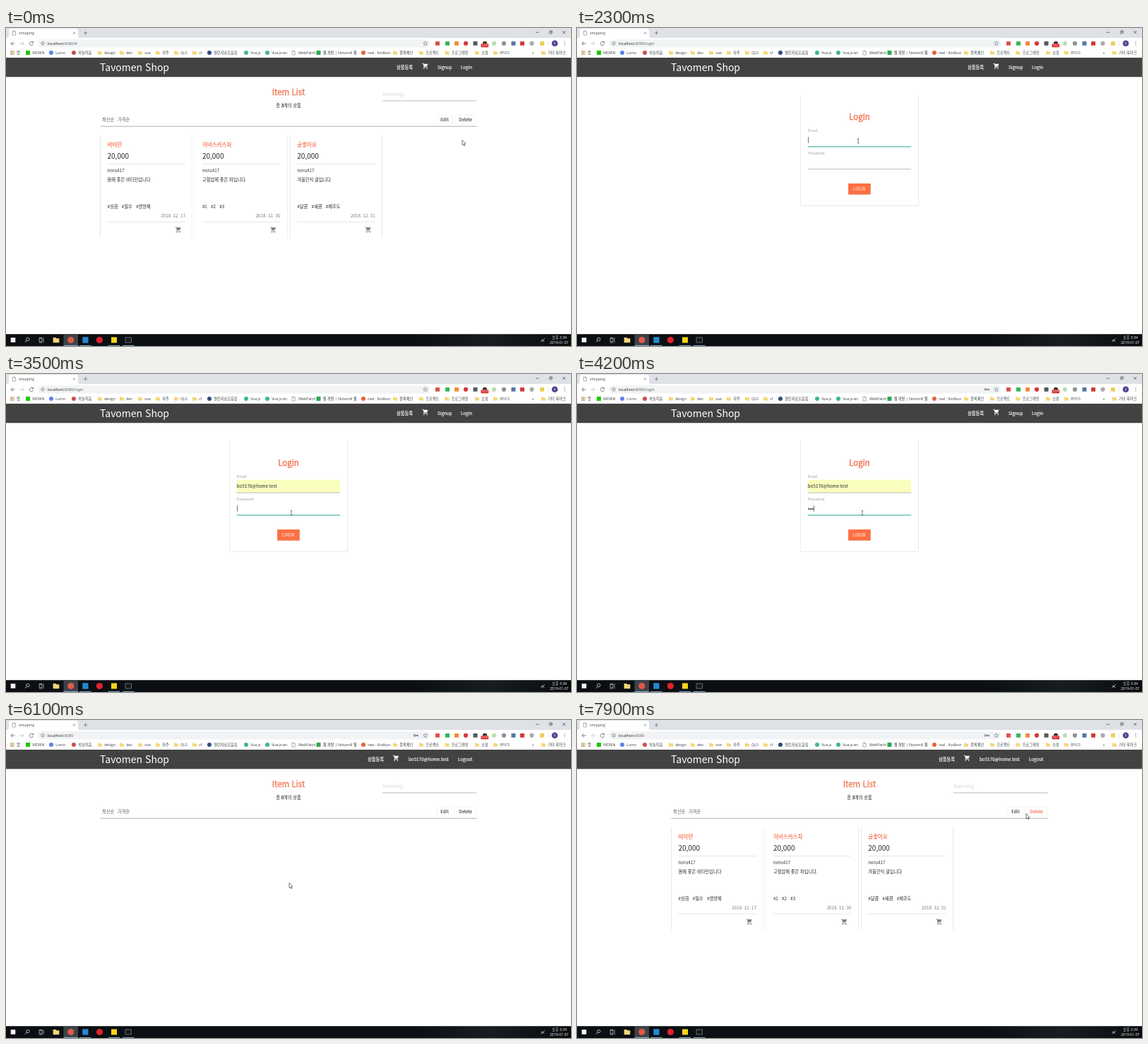
Write an HTML page that moves like this. It is 800x450 px and loops after 8 s.

```html
<!DOCTYPE html>
<html lang="ko">
<head>
<meta charset="utf-8">
<title>shopping</title>
<style>
html, body { margin: 0; width: 100%; height: 100%; overflow: hidden; background: #fff; }
svg { display: block; width: 800px; height: 450px; }
text { white-space: pre; font-family: "Noto Sans CJK KR", "Noto Sans CJK JP", "Noto Sans", sans-serif; }
.ui { font-family: "Open Sans", "Noto Sans CJK KR", "Noto Sans CJK JP", sans-serif; }
.card { filter: drop-shadow(0 .7px .6px rgba(0, 0, 0, .38)); }
</style>
</head>
<body>
<svg id="stage" viewBox="0 0 800 450"></svg>
<script>
const NS = 'http://www.w3.org/2000/svg';
const LOOP = 8000, TICK = 100;
const ORANGE = '#f26f4f', TEAL = '#26a69a', MAIL = 'bo5170@home.test';
const stage = document.getElementById('stage');
let layer = stage;

function el(tag, attrs = {}, parent = layer) {
  const node = document.createElementNS(NS, tag);
  for (const k in attrs) node.setAttribute(k, attrs[k]);
  parent.appendChild(node);
  return node;
}
const rect = (x, y, width, height, fill, more) => el('rect', { x, y, width, height, fill, ...more });
const dot = (cx, cy, r, fill, more) => el('circle', { cx, cy, r, fill, ...more });
const line = (d, stroke, width = .7, more) =>
  el('path', { d, stroke, 'stroke-width': width, fill: 'none', ...more });
const shape = (d, fill, more) => el('path', { d, fill, ...more });
function text(x, y, str, size, fill, more) {
  const node = el('text', { x, y, 'font-size': size, fill, ...more });
  node.textContent = str;
  return node;
}
const ui = (x, y, str, size, fill, more) => text(x, y, str, size, fill, { class: 'ui', ...more });
const medium = (x, y, str, size, fill, more) =>
  text(x, y, str, size, fill, { stroke: fill, 'stroke-width': size * .028, ...more });
const mid = { 'text-anchor': 'middle' }, end = { 'text-anchor': 'end' };

function group(build, attrs) {
  const outer = layer, g = el('g', attrs);
  layer = g;
  build();
  layer = outer;
  return g;
}
const show = (node, on) => { node.style.display = on ? '' : 'none'; };

function cart(x, y, fill) {
  group(() => {
    shape('M1 2H4.3L5.2 4H20.5L16.5 13H8.1L7 15H19V17H6Q4 17 5.3 14L6.6 11.6 3 4H1Z', fill);
    dot(7, 20, 2, fill);
    dot(17, 20, 2, fill);
  }, { transform: `translate(${x} ${y}) scale(.4167)` });
}
function folder(x, y, s = 1) {
  shape('M-3-2.5H-.5L.3-1.6H3V2.5H-3Z', '#f4d675', { transform: `translate(${x} ${y}) scale(${s})` });
}
function sheet(x, y) {
  line(`M${x - 2} ${y - 3}h2.6l1.6 1.6v4.4h-4.2zM${x + .5} ${y - 3}v1.7h1.7`, '#666', .5);
}

// Browser frame
rect(0, 0, 800, 450, '#fff');
rect(0, 0, 800, 14, '#dee1e6');
shape('M1 14Q4 14 4 11V4Q4 1 7 1H99Q102 1 102 4V11Q102 14 105 14Z', '#fff');
sheet(11.5, 7);
ui(18, 9, 'shopping', 5.1, '#45494d');
line('M95 5.5l3 3m0-3l-3 3', '#5f6368', .6);
line('M110 7h5M112.5 4.5v5', '#5f6368', .7);
line('M750 6.2h4.5M788.2 4l4 4m0-4l-4 4', '#222', .6);
line('M769.3 4.9h2.9v2.9h-2.9zM770.4 4.9v-1h2.9v2.9h-1.1', '#222', .5);
line('M12.5 22H7m2.5-2.6L7 22l2.5 2.6', '#5f6368', .8);
line('M19.5 22H25m-2.5-2.6L25 22l-2.5 2.6', '#bcc0c4', .8);
line('M38 20.3A2.7 2.7 0 1 0 38.5 22.8M38.6 18.9v2h-2', '#5f6368', .8);
rect(45, 16.2, 555, 11.2, '#f1f3f4', { rx: 5.6 });
dot(52, 21.8, 2.3, 'none', { stroke: '#5f6368', 'stroke-width': .6 });
line('M52 21.5v1.6M52 20.2v.6', '#5f6368', .6);
const url = ui(59, 23.8, '', 5.4, '#5f6368');
const host = el('tspan', { fill: '#202124' }, url), path = el('tspan', {}, url);
host.textContent = 'localhost';
const key = group(() => {
  dot(578.6, 21.8, 1.3, 'none', { stroke: '#555', 'stroke-width': .9 });
  line('M580 21.8h3.5v1.4m-1.3-1.4v1.2', '#555', .9);
});
line('M593.8 18.8l.9 2 2.1.2-1.6 1.4.5 2.1-1.9-1.1-1.9 1.1.5-2.1-1.6-1.4 2.1-.2z', '#5f6368', .55);

// Extension buttons: x, colour, round
[[611, '#d9534a'], [625, '#35b558'], [638, '#f08a3c'], [651, '#d6373c', 1], [664.5, '#55585c'],
 [678, '#3b3431', 1], [691, '#b9dfae', 1], [705, '#8d9296', 1], [718.5, '#54779f'],
 [731, '#d23a3a'], [744.5, '#a7abae', 1], [759, '#eecf58']].forEach(([x, c, round]) =>
  round ? dot(x, 21.8, 3.1, c) : rect(x - 3, 19, 6, 5.8, c, { rx: .6 }));
rect(672.5, 22.2, 10.6, 5, '#d71f1f', { rx: .8 });
const badge = ui(677.8, 26.4, '', 4.4, '#fff', mid);
line('M767.5 18.5v6.5', '#d4d7da', .5);
dot(777, 21.8, 4.3, '#4b4491');
ui(777, 23.7, 'Y', 5.2, '#fff', mid);
[19.6, 21.8, 24].forEach(y => dot(791, y, .6, '#5f6368'));

// Bookmarks: icon centre, label, colour (folder when absent)
[[31, 'MORIN', '#1ec800'], [64, 'Lumo', '#5b82e8', 1], [96, '하늘피움', '#c9504a', 1], [133, 'design'],
 [164, 'dev'], [190, 'vue'], [215, '자주'], [241, 'QLS'], [267, 'cf'],
 [288, '열린자료모음집', '#334b80', 1], [340, 'Vue.js', '#41b883', 1], [370, 'Vue.js-en', '#41b883', 1],
 [407, '.WebPatch', 'sheet'], [442.5, '웹 개발 | Notamill 웹', '#2fa84f'], [506, 'real · Kodbun', '#e8623a', 1],
 [551, '블록체인'], [588, '프로젝트'], [624.5, '프로그래밍'], [667, '쇼핑'], [693, 'EPICS'], [761, '기타 북마크']
].forEach(([x, label, c, round]) => {
  if (!c) folder(x, 35);
  else if (c === 'sheet') sheet(x, 35);
  else if (round) dot(x, 35, 3, c);
  else rect(x - 3, 32, 6, 6, c);
  ui(x + 6.2, 36.9, label, 5.2, '#3c4043');
});
for (let i = 0; i < 9; i++)
  rect(6.5 + i % 3 * 2.1, 32.3 + Math.floor(i / 3) * 2.1, 1.5, 1.5, ['#e66a55', '#5ca866', '#e6b34d'][i % 3]);
ui(15, 36.9, '앱', 5.2, '#3c4043');
ui(744.5, 37, '»', 6, '#3c4043');

// Site header
rect(0, 42, 800, 27.2, '#424242', { class: 'card' });
text(133, 61, 'Tavomen Shop', 14, '#fff');
const guestNav = group(() => {
  medium(553, 58, '상품등록', 6.25, '#fff');
  cart(589, 49, '#fff');
  medium(611, 58, 'Signup', 6.25, '#fff');
});
const loginLink = group(() => {
  rect(638, 42, 29, 27.2, 'rgba(0,0,0,.12)');
});
const loginLabel = medium(644, 58, 'Login', 6.25, '#fff');
const userNav = group(() => {
  medium(512, 58, '상품등록', 6.25, '#fff');
  cart(547.5, 49, '#fff');
  medium(570, 58, MAIL, 6.25, '#fff');
  medium(640, 58, 'Logout', 6.25, '#fff');
});

// Item list
let count, deleteLabel, cards;
const listPage = group(() => {
  medium(400, 95, 'Item List', 11.5, '#ee7858', mid);
  const total = text(400, 112, '총 ', 6.25, '#222', mid);
  count = el('tspan', { stroke: '#222', 'stroke-width': .25 }, total);
  el('tspan', {}, total).textContent = '개의 상품';
  text(533, 96, 'Searching..', 6.25, '#d2d2d2');
  line('M533 103H666.5', '#a8a8a8', .8);
  text(136, 132, '최신순', 6.25, '#5c5c5c');
  text(158, 132, '가격순', 6.25, '#5c5c5c');
  line('M133.3 139.2H666.7', '#b0b0b0', 1);
  [[610, 22], [635, 31]].forEach(([x, w]) =>
    rect(x, 123, w, 13.2, '#fff', { rx: 3, stroke: '#ececec', 'stroke-width': .6 }));
  medium(621, 132, 'Edit', 6.25, '#444', mid);
  deleteLabel = medium(650.7, 132, 'Delete', 6.25, '#444', mid);
  cards = group(() => [
    ['비타민', '몸에 좋은 비타민입니다', '#상큼   #필수   #영양제', '2018. 12. 17'],
    ['히비스커스차', '고혈압에 좋은 차입니다.', '#1   #2   #3', '2018. 11. 30'],
    ['귤좋아요', '겨울간식 귤입니다', '#달콤   #새콤   #제주도', '2018. 12. 31']
  ].forEach(([name, note, tags, date], i) => group(() => {
    rect(0, 151, 130.3, 146, '#fff', { rx: .9, class: 'card' });
    medium(10, 167.7, name, 7.5, ORANGE);
    text(10, 185, '20,000', 10, '#222');
    line('M10 192.5H120.3M10 274.5H120.3', '#dcdcdc', .7);
    text(10, 204, 'noru417', 6.25, '#333');
    text(10, 217, note, 6.25, '#222');
    text(10, 254.5, tags, 6.25, '#222');
    text(120.5, 268, date, 6.25, '#7a7a7a', end);
    cart(105.7, 280.7, '#7d7d7d');
  }, { transform: `translate(${133.5 + i * 134.4} 0)` })));
});

// Login form
let mailFill, mailLine, passLine, squiggle, caret;
const dots = [];
const loginPage = group(() => {
  rect(316.7, 94, 166.7, 157.5, '#fff', { rx: .9, class: 'card' });
  medium(400, 129.5, 'Login', 11.5, ORANGE, mid);
  text(326.8, 147, 'Email', 5.3, '#9e9e9e');
  text(326.8, 178.8, 'Password', 5.3, '#9e9e9e');
  mailFill = group(() => {
    rect(326.8, 149.7, 146.4, 18.3, '#faffbd');
    text(326.8, 161, MAIL, 6.25, '#222');
  });
  squiggle = line('M327 163' + 'q.6-1 1.2 0t1.2 0'.repeat(9), '#e53935', .45);
  mailLine = line('M326.8 168H473.2', '#9e9e9e');
  passLine = line('M326.8 199.7H473.2', '#9e9e9e');
  for (let i = 0; i < 8; i++) dots.push(dot(328.3 + i * 2.7, 191, 1, '#111'));
  caret = rect(0, 0, .6, 8.4, '#111');
  rect(384.2, 220, 31.4, 15.6, '#ff7043', { rx: .9, class: 'card' });
  text(400, 229.8, 'LOGIN', 5.7, '#fff', { ...mid, 'letter-spacing': .2 });
});

const status = group(() => {
  rect(-1, 424.4, 267.5, 9.6, '#f3f4f5', { stroke: '#d5d8db', 'stroke-width': .5, rx: 1 });
  ui(1.2, 430.8, 'localhost:8080/login', 5, '#5f6368');
});

// Taskbar
const fade = el('linearGradient', { id: 'bar' });
[['0', '#0b0f13'], ['.72', '#0b0f12'], ['.86', '#171d20'], ['1', '#080b0e']].forEach(([offset, c]) =>
  el('stop', { offset, 'stop-color': c }, fade));
rect(0, 433.2, 800, 17, 'url(#bar)');
rect(81.5, 433.2, 20.5, 17, '#3d4347');
rect(6.7, 438.2, 6.6, 6.6, '#f2f2f2');
dot(30.8, 440.5, 2.2, 'none', { stroke: '#eee', 'stroke-width': .7 });
line('M29.2 442.2l-2.2 2.4', '#eee', .8);
line('M47 439.5h4v4.2h-4zM47 438v.3h4V438M47 445v.2h4M53 438v7.5', '#eee', .6);
folder(71, 441.5, 1.45);
dot(91.8, 441.5, 4.6, '#e2594a');
rect(108.3, 437.3, 8.2, 8.4, '#2489d1');
dot(132.4, 441.5, 4.6, '#e0222c');
rect(149, 437.5, 8, 8, '#f7d618');
rect(169, 438, 8.6, 7, '#16191c', { stroke: '#9aa0a4', 'stroke-width': .6 });
line('M81.5 449.4H102M104 449.4H120.5M144.5 449.4H161M165 449.4H181.5', '#8fc4ea', .9);
line('M757.3 444.3q1-2 2.4-1.6l3-3.4M758 441q3 .6 4 3', '#eee', .7);
ui(783.5, 439.8, '오후 3:34', 5.2, '#fff', mid);
ui(783.2, 447.4, '2019-01-07', 5.1, '#fff', mid);

// Pointers share one hot spot
const ink = { stroke: '#111', 'stroke-width': .55, 'stroke-linejoin': 'round' };
const pointers = {
  arrow: shape('M0 0V7.2L1.7 5.7 2.8 8.2 3.9 7.7 2.8 5.3H5Z', '#fff', ink),
  hand: shape('M-.8.6Q0-.5.8.6V3L3.6 3.6Q4.4 4 4.1 5.2L3.4 8.6H-.6L-2.7 5.2Q-2.5 4-1.5 4.5L-.8 5Z', '#fff', ink),
  beam: line('M-1.3-3.3Q0-3.3 0-2.6Q0-3.3 1.3-3.3M0-2.8V2.8M-1.3 3.3Q0 3.3 0 2.6Q0 3.3 1.3 3.3', '#333', .65)
};

// Time, x, y
const track = [[0, 646, 158.5], [200, 646, 158.5], [1000, 648, 57], [1400, 648, 57], [1900, 400, 158],
  [2400, 398, 160], [2800, 409.5, 190], [3100, 404, 196.5], [5300, 404, 196.5], [5700, 401, 230.5],
  [6500, 401, 230.5], [7800, 636, 132.5], [LOOP, 636, 132.5]];
const at = { login: 1200, mail: 2000, fill: 2400, pass: 3100, type: 3660, home: 6000, items: 6200 };

function pointerAt(t) {
  const i = track.findIndex(p => p[0] > t);
  const [t0, x0, y0] = track[i - 1], [t1, x1, y1] = track[i];
  const p = (t - t0) / (t1 - t0), e = p * p * (3 - 2 * p);
  return [x0 + (x1 - x0) * e, y0 + (y1 - y0) * e];
}
const inside = ([x, y], l, t, r, b) => x >= l && x <= r && y >= t && y <= b;

function focusLine(node, on) {
  node.setAttribute('stroke', on ? TEAL : '#9e9e9e');
  node.setAttribute('stroke-width', on ? 1.1 : .7);
}

function draw(t) {
  const form = t >= at.login && t < at.home, user = t >= at.home;
  const pos = pointerAt(t);
  const typed = Math.max(0, Math.min(8, Math.floor((t - at.type) / 180)));
  const onLink = !user && inside(pos, 638, 42, 667, 69);
  const onField = form && (inside(pos, 327, 150, 473, 168) || inside(pos, 327, 181, 473, 200));
  const onButton = form && inside(pos, 384, 220, 416, 236);
  const kind = onLink || onButton ? 'hand' : onField ? 'beam' : 'arrow';

  path.textContent = ':8080' + (user ? '' : form ? '/login' : '/#');
  badge.textContent = '0:0' + Math.floor(t / 1000);
  show(key, typed > 0);
  show(guestNav, !user);
  show(loginLabel, !user);
  show(loginLink, onLink);
  show(status, onLink);
  show(userNav, user);
  show(listPage, !form);
  show(loginPage, form);

  const loaded = !user || t >= at.items;
  show(cards, loaded);
  count.textContent = loaded ? 3 : 0;
  const hot = inside(pos, 635, 123, 666, 136) ? ORANGE : '#444';
  deleteLabel.setAttribute('fill', hot);
  deleteLabel.setAttribute('stroke', hot);

  const onMail = t >= at.mail && t < at.pass, onPass = t >= at.pass, filled = t >= at.fill;
  show(mailFill, filled);
  show(squiggle, filled && onMail);
  focusLine(mailLine, onMail);
  focusLine(passLine, onPass);
  dots.forEach((d, i) => show(d, i < typed));
  const lastKey = typed ? at.type + typed * 180 : onPass ? at.pass : filled ? at.fill : at.mail;
  show(caret, (onMail || onPass) && (t - lastKey) % 1000 < 500);
  caret.setAttribute('x', onPass ? 327 + typed * 2.7 : filled ? 384.6 : 327);
  caret.setAttribute('y', onPass ? 186.3 : 154.3);

  for (const k in pointers) show(pointers[k], k === kind);
  pointers[kind].setAttribute('transform', `translate(${pos[0].toFixed(2)} ${pos[1].toFixed(2)})`);
}

function frame() {
  const t = performance.now() % LOOP;
  draw(Math.floor(t / TICK) * TICK);
  requestAnimationFrame(frame);
}
frame();
</script>
</body>
</html>
```
